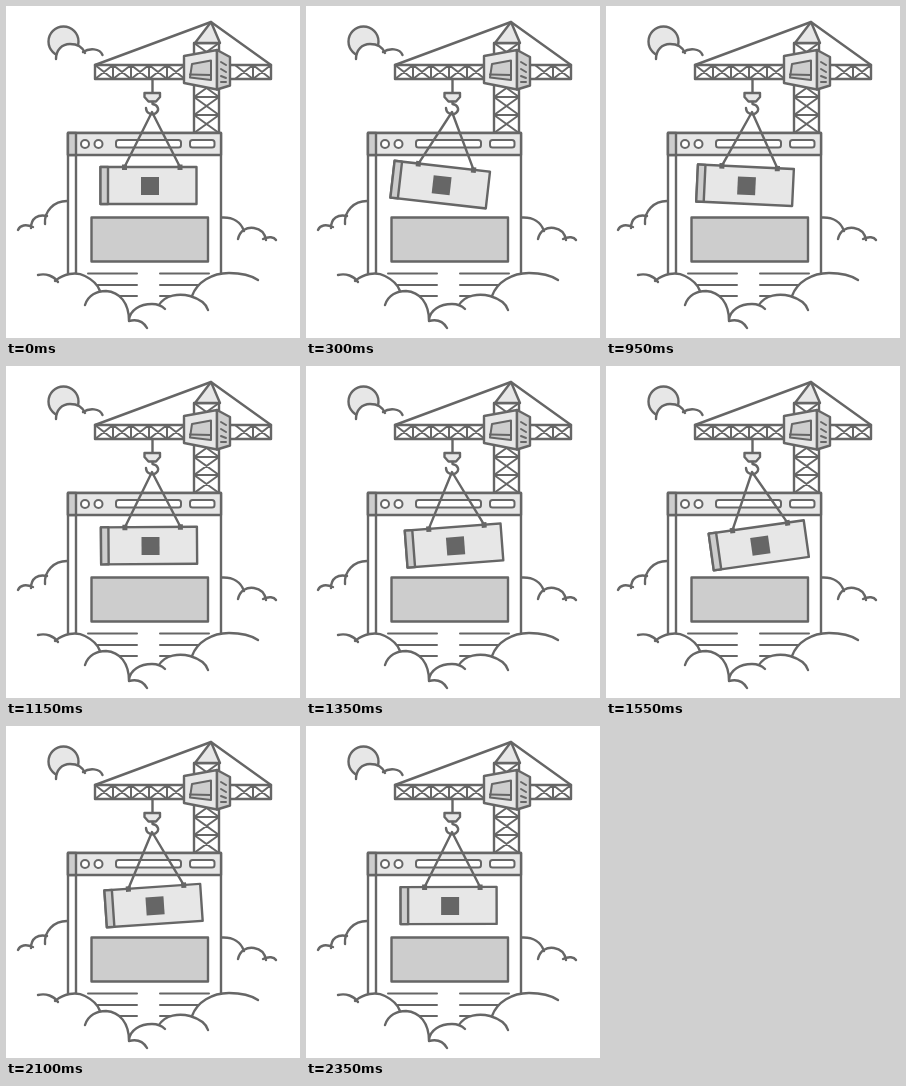
Animation, 294 px wide and 332 px high, one loop 2400 ms. Source, as an HTML page:

```html
<!DOCTYPE html>
<html lang="en">
<head>
<meta charset="utf-8">
<title>Under construction</title>
<style>
html, body { margin: 0; width: 100%; height: 100%; overflow: hidden; background: #fff; }
svg { display: block; width: 294px; height: 332px; }
.ink { fill: none; stroke: #666; stroke-width: 2.4; stroke-linejoin: round; stroke-linecap: round; }
.thin { stroke-width: 2; }
.pale { fill: #e7e7e7; }
.mid { fill: #cdcdcd; }
.white { fill: #fff; }
.solid { fill: #666; stroke: none; }
</style>
</head>
<body>
<svg viewBox="0 0 294 332">
  <!-- sun and small cloud -->
  <circle class="ink pale" cx="57.500" cy="35.500" r="15"/>
  <path class="white" d="M50 53C50 44 56 38 64 38C72 38 77 42 79 47V56H50Z"/>
  <path class="ink" d="M50 53C50 44 56 38 64 38C72 38 77 42 79 47M77 46C83 42 94 42 96.500 49"/>

  <!-- crane -->
  <g class="ink">
    <path class="white" d="M188 37H213V127H188Z"/>
    <path id="mast" class="thin"/>
    <path class="pale" d="M205 16L189 37H214Z"/>
    <path d="M205 16L89 59M205 16L265 59"/>
    <path class="white" d="M89 59H265V73H89Z"/>
    <path id="jib" class="thin"/>
    <path class="pale" d="M178 50L211 44V83.500L178 77Z"/>
    <path class="mid" d="M211 44L224 51V79.500L211 83.500Z"/>
    <path class="mid thin" d="M186 58L205 54.500V74L184 71.500Z"/>
    <path class="thin" d="M184 68.500L205 69"/>
    <path class="thin" d="M215 56L220 59M215 63L220 66M215 70L220 72M215 76H220"/>
  </g>

  <!-- browser window -->
  <g class="ink">
    <path class="white" d="M62 300V127H215V300"/>
    <path class="pale" d="M62 127H215V149H62Z"/>
    <path class="mid" d="M62 127H70V149H62Z"/>
    <path d="M70 149V300"/>
    <g class="thin white">
      <circle cx="79" cy="138" r="4"/>
      <circle cx="92.500" cy="138" r="4"/>
      <rect x="110" y="134" width="65" height="7.500" rx="2.500"/>
      <rect x="184" y="134" width="24.500" height="7.500" rx="2.500"/>
    </g>
    <path class="mid" d="M85.500 211.500H202V255.500H85.500Z"/>
    <path class="thin" d="M82 267.500H131M82 279H131M82 290H131M154 267.500H203M154 279H203M154 290H203"/>
  </g>

  <!-- hook -->
  <g class="ink">
    <path d="M146.500 73V87"/>
    <path class="pale" d="M138.500 87H154V91L150 95.500H142.500L138.500 91Z"/>
    <path d="M146.500 96V98C152 99 154 104 150 107C146 110 140 107 140 102"/>
  </g>

  <!-- hanging panel -->
  <g id="load" class="ink">
    <path d="M118.500 161L146 106L174 161"/>
    <path class="pale" d="M94.500 161H190.500V198H94.500Z"/>
    <path class="mid" d="M94.500 161H102V198H94.500Z"/>
    <path class="solid" d="M116 158.500H121V164H116ZM171.500 158.500H176.500V164H171.500Z"/>
    <rect class="solid" x="135" y="171" width="18" height="18"/>
  </g>

  <!-- clouds -->
  <path class="white" d="M32 269C40 267 48 270 51 274C58 268 70 265 79 270C87 274 92 279 94 286C111 283 123 296 123 313C124 304 134 298 146 298L153 299C159 289 173 287 186 290C191 276 206 267 223 267C236 267 246 270 252 274V332H32Z"/>
  <path class="ink" d="M12 224C14 219 20 218 27 221M25 222C25 212 32 208 41 210M39 218C38 205 48 195 61 195
    M216 211.500C227 211 235 216 238 225M232 233C234 224 241 221 248 222C255 223 259 228 260 234M257 233C263 230 268 231 270 234
    M32 269C40 267 48 270 52 276M49 275C57 268 70 265 79 270C87 274 92 279 94 285
    M79 299C82 289 91 285 100 285C114 286 123 297 123 315C131 313 137 315 141 322
    M123 314C124 304 134 298 146 298C152 298 156 300 159 303M153 299C159 289 173 287 184 290C194 293 200 297 202 304
    M186 290C191 276 206 267 223 267C236 267 246 270 252 274"/>
</svg>
<script>
const PERIOD = 2400;
// Swing keys: time in ms, angle in degrees
const keys = [[0, 0], [300, 6.5], [500, 8.5], [700, 6.1], [1120, 0.1],
  [1550, -8], [1690, -8.7], [1850, -7.5], [2200, -2.4], [2350, -0.1]];

const byId = id => document.getElementById(id);

// Crossed braces with a post at each joint, from x0 to x1
function jibBays(x0, x1, count) {
  const step = (x1 - x0) / count;
  let d = "";
  for (let i = 0; i < count; i++) {
    const a = x0 + i * step, b = a + step;
    d += `M${a} 59L${b} 73V59L${a} 73`;
  }
  return d;
}

function mastBays(y0, y1, count) {
  const step = (y1 - y0) / count;
  let d = "";
  for (let i = 0; i < count; i++) {
    const a = y0 + i * step, b = a + step;
    d += `M188 ${a}L213 ${b}H188L213 ${a}`;
  }
  return d;
}

byId("jib").setAttribute("d", jibBays(89, 179, 5) + jibBays(229, 265, 2));
byId("mast").setAttribute("d", mastBays(37, 127, 5));

function keyAt(i) {
  const n = keys.length, turn = Math.floor(i / n);
  const [t, a] = keys[i - turn * n];
  return [t + turn * PERIOD, a];
}

function slope(i) {
  const [t0, a0] = keyAt(i - 1), [t1, a1] = keyAt(i + 1);
  return (a1 - a0) / (t1 - t0);
}

// Smooth cubic curve through the keys
function angle(t) {
  let i = keys.length - 1;
  while (keys[i][0] > t) i--;
  const [t0, a0] = keyAt(i), [t1, a1] = keyAt(i + 1);
  const span = t1 - t0, u = (t - t0) / span, v = 1 - u;
  return v * v * (1 + 2 * u) * a0 + u * u * (3 - 2 * u) * a1
    + u * v * span * (v * slope(i) - u * slope(i + 1));
}

const load = byId("load");
const start = performance.now();

function draw(now) {
  const t = Math.max(0, now - start) % PERIOD;
  const held = Math.floor(t / 50) * 50;
  load.setAttribute("transform", `rotate(${angle(held).toFixed(3)} 146 106)`);
  requestAnimationFrame(draw);
}
draw(start);
</script>
</body>
</html>
```
